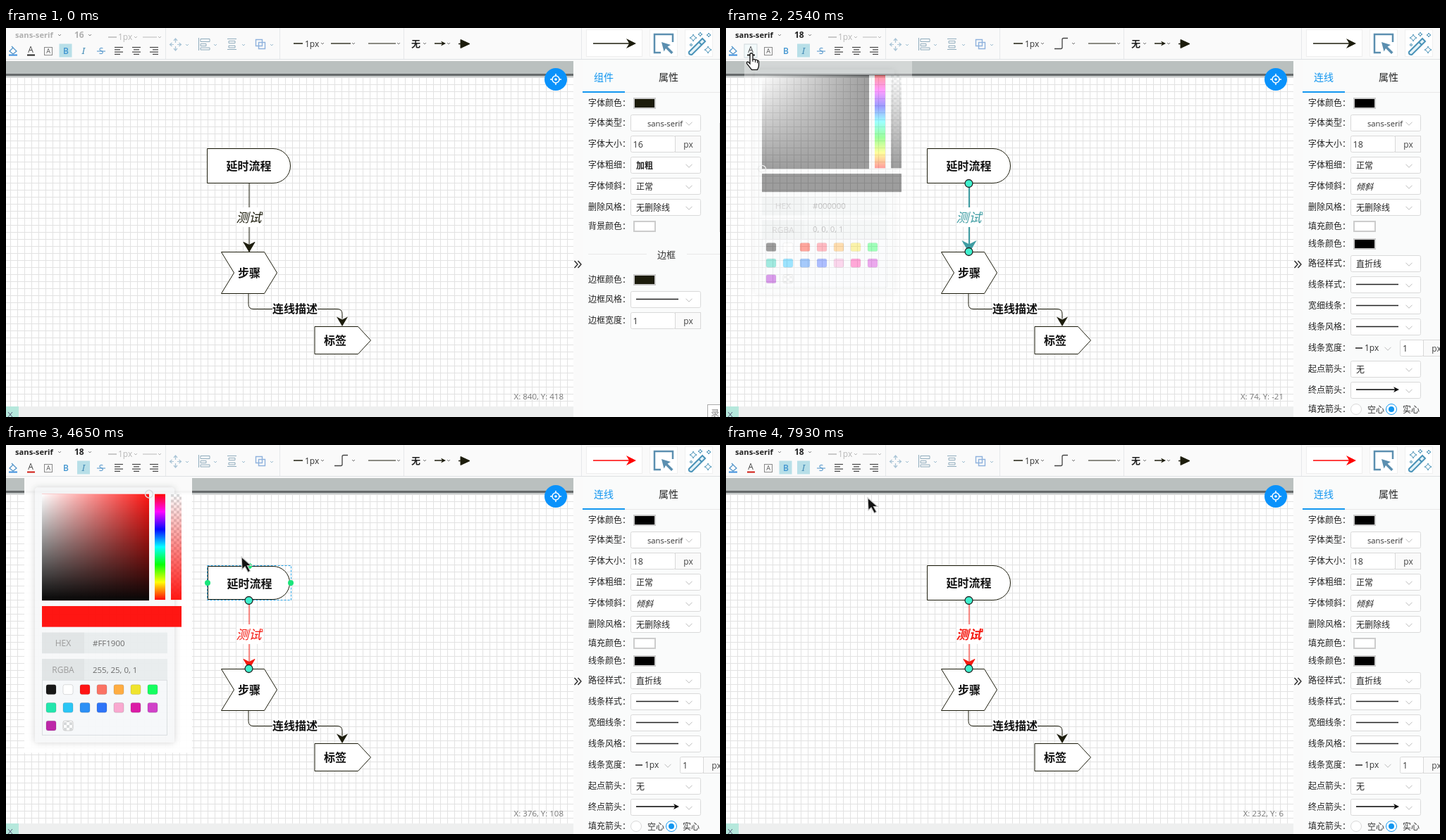
Animation of 1013 by 553 pixels, one loop 8 s. Source, as an HTML page:

```html
<!DOCTYPE html>
<html lang="zh-CN">
<head>
<meta charset="utf-8">
<title>Flow editor</title>
<style>
  html, body { margin: 0; width: 100%; height: 100%; overflow: hidden; background: #fafafa; }
  svg { display: block; font-family: "Open Sans", "Noto Sans CJK SC", "Noto Sans CJK", sans-serif; }
  .zh { font-family: "Noto Sans CJK SC", "Noto Sans CJK", sans-serif; }
</style>
</head>
<body>
<svg id="stage" width="1013" height="553" viewBox="0 0 1013 553"></svg>
<script>
const LOOP = 8000, STEP = 131.8;
const INK = '#1c1c0c', TEAL = '#3f9da3', RED = '#f5180f', BLUE = '#1296f0', ICON = '#5b8fb0', FADED = '#b8b8b8';

// ---- drawing helpers, all returning SVG markup
const line = (x1, y1, x2, y2, color = INK, w = 1, more = '') =>
  `<line x1="${x1}" y1="${y1}" x2="${x2}" y2="${y2}" stroke="${color}" stroke-width="${w}" ${more}/>`;
const rect = (x, y, w, h, fill, stroke = 'none', more = '') =>
  `<rect x="${x}" y="${y}" width="${w}" height="${h}" fill="${fill}" stroke="${stroke}" ${more}/>`;
const path = (d, stroke = INK, fill = 'none', w = 1, more = '') =>
  `<path d="${d}" stroke="${stroke}" fill="${fill}" stroke-width="${w}" ${more}/>`;
const dot = (x, y, r, fill, stroke = 'none', w = 1) =>
  `<circle cx="${x}" cy="${y}" r="${r}" fill="${fill}" stroke="${stroke}" stroke-width="${w}"/>`;
const text = (x, y, str, size = 12, fill = '#333', more = '') =>
  `<text x="${x}" y="${y + size * 0.37}" font-size="${size}" fill="${fill}" ${more}>${str}</text>`;
const group = (id, body, more = '') => `<g id="${id}" ${more}>${body}</g>`;
const bold = 'font-weight="700"', mid = 'text-anchor="middle"', zh = 'class="zh"';
const caret = (x, y, color = '#777', r = 2) => path(`M${x - r} ${y - r / 2}l${r} ${r}l${r} ${-r}`, color);
const arrowRight = (x1, x2, y, size, color = INK, w = 1.5) => line(x1, y, x2 - size * .6, y, color, w) +
  path(`M${x2} ${y}l${-size} ${-size / 2}l${size * .3} ${size / 2}l${-size * .3} ${size / 2}z`, 'none', color);
const arrowDown = (x, y) => `<path d="M${x} ${y}l-8-13.500l8 4l8-4z"/>`;

// ---- toolbar
function toolbar() {
  const carets = [[257, 24], [297, 24], [337, 24], [377, 24]].map(([x, y]) => caret(x, y, '#9dbdd0')).join('');
  const aligns = [[154, 0], [179, .5], [204, 1]].map(([x, a]) =>
    [12, 8, 12, 8].map((w, i) => line(x + (12 - w) * a, 27.5 + i * 3.3, x + (12 - w) * a + w, 27.5 + i * 3.3, '#444', 1.2)).join('')).join('');
  const soft = '#a9c4d6';
  return rect(0, 0, 1013, 45, '#fafafa') + line(0, 44.5, 1013, 44.5, '#dfe2e4') +
    group('font', text(13, 10, 'sans-serif', 11.2, 'currentColor', bold) + text(97, 10, '<tspan id="size">16</tspan>', 12, 'currentColor', bold)) +
    caret(76, 10, '#888') + caret(119, 10, '#888') +
    line(145, 13, 157, 13, FADED, 1.5) + text(159, 13, '1px', 12, FADED) + caret(184, 13, FADED) +
    line(194, 13, 214, 13, FADED) + caret(218, 13, FADED) +
    rect(75.500, 22.500, 18, 19, '#b8dfe8', 'none', 'id="boldOn"') +
    rect(101, 22.500, 18, 19, '#b8dfe8', 'none', 'id="italicOn"') +
    rect(26, 23, 18, 19, '#f3fafb', '#cfd8dc', 'id="hover"') +
    path('M5 33l5-5l5 5l-5 4zM8 26l3 3', '#4a90c8', 'none', 1.2) + line(4, 38.500, 16, 38.500, '#3b8ddd', 2) +
    text(35, 31, 'A', 12, '#444', mid) + line(30, 38.500, 41, 38.500, INK, 2, 'id="inkBar"') +
    rect(54.500, 27.500, 11, 11, 'none', '#888') + text(60, 33, 'A', 9, '#555', mid) +
    text(85, 32.500, 'B', 12, '#3f95d0', mid + ' font-weight="600"') +
    text(110, 32.500, 'I', 13, '#4a90b8', mid + ' style="font-family:Noto Serif,serif" font-style="italic"') +
    text(135, 32.500, 'S', 12, '#4a90c8', mid) + line(129, 33, 141, 33, '#4a90c8') + aligns +
    [226.500, 388.500, 564.500, 816.500].map(x => line(x, 0, x, 44, '#e6e8ea')).join('') + carets +
    path('M240.500 16v5M240.500 26v5M233 23.500h5M243 23.500h5M238 18l2.500-3l2.500 3M238 29l2.500 3l2.500-3M235.500 21l-3 2.500l3 2.500M245.500 21l3 2.500l-3 2.500', soft, 'none', 1.2) +
    path('M273.500 14v18M276 15.500h13v4h-13zM276 22.500h8v3h-8zM276 28h13v3h-13z', '#8eabbc') +
    path('M314 15.500h13M314 30.500h13M316 18.500h9v3h-9zM316 25h9v3h-9z', '#8eabbc') +
    path('M354.500 16.500h9v9h-9zM358.500 20.500h9v9h-9z', '#8fb2dd', 'none', 1.4) +
    line(408, 22, 421, 22, INK, 1.5) + text(424, 22.500, '1px', 12, '#333') + caret(449, 22) +
    line(461, 22, 489, 22, INK, 1.3, 'id="straight"') + path('M466 29.500h9q2 0 2-2v-11q0-2 2-2h6', '#444', 'none', 1.3, 'id="ortho"') +
    caret(493, 22) + line(514, 22, 553, 22, INK, 1.2) + caret(557, 22) +
    text(575, 22, '无', 13, '#222', bold + zh) + caret(594, 22) + arrowRight(608, 624, 22, 7) + caret(628, 22) +
    path('M645 16.500l13 6l-13 6z', INK, INK) + line(642, 22.500, 646, 22.500, INK, 1.5) +
    rect(823.500, 2.500, 79, 38, '#fff', '#eee') + group('preview', arrowRight(833, 894, 22, 14, 'currentColor', 1.4)) +
    rect(913.500, 2.500, 39, 38, '#fff', '#f0f0f0') + rect(963.500, 2.500, 39, 38, '#fff', '#f0f0f0') +
    path('M929 35h-9v-26h26v11', ICON, 'none', 2.5) + path('M930 20l13 4l-4.500 2.500l8 8l-2.500 2.500l-8-8l-2.500 4.500z', 'none', ICON) +
    path('M969 34l19-19l4 4l-19 19q-5 0-4-4zM983 20l4 4', '#4a93b8', '#e5f3f8', 2) +
    [[975, 14, 5], [996, 31, 5], [985, 9, 3], [997, 10, 3], [972, 24, 2]].map(([x, y, r]) =>
      path(`M${x} ${y - r}l${r / 3} ${r * 2 / 3}l${r * 2 / 3} ${r / 3}l${-r * 2 / 3} ${r / 3}l${-r / 3} ${r * 2 / 3}l${-r / 3} ${-r * 2 / 3}l${-r * 2 / 3} ${-r / 3}l${r * 2 / 3} ${-r / 3}z`, '#4a93b8')).join('');
}

// ---- diagram
function diagram() {
  const node = str => `${bold} ${mid} ${str || ''} ${zh}`;
  return rect(0, 47, 805, 506, '#fff') + rect(0, 69, 805, 469, 'url(#grid)') +
    rect(0, 47, 805, 22, '#bac0bf') + rect(0, 65, 805, 3, '#666a6b') + rect(0, 68, 805, 2, '#c4c8c8') +
    rect(0, 538, 805, 15, '#eeefef') + rect(0, 538, 18, 15, '#b5e8dc') + path('M3 546l6 7M9 546l-6 7', '#557') +
    path('', INK, '#fff', 1, 'id="delay"') + text(344.500, 196, '延时流程', 16, '#111', node('id="delayText"')) +
    path('M305.500 318.500h61l18 29.500l-18 29.500h-61l18-29.500z', INK, '#fff') + text(345, 348, '步骤', 16, '#111', node()) +
    path('M438 424.500h61.500l18 19.500l-18 19.500h-61.500z', INK, '#fff') + text(467, 444, '标签', 16, '#111', node()) +
    path('M344 378v14.500q0 7 7 7h119q7 0 7 7v7') + `<g fill="${INK}">${arrowDown(477, 424)}</g>` +
    rect(378, 389, 64, 21, '#fff') + text(410, 399, '连线描述', 16, '#111', node()) +
    group('edge', line(345, 221, 345, 310, 'currentColor') +
      `<g fill="currentColor" stroke="currentColor" stroke-width=".5">${arrowDown(345, 318)}</g>` +
      rect(327, 255, 37, 28, '#fff') + text(344.500, 269.500, '测试', 18, 'currentColor', `${mid} font-style="italic" id="edgeText" ${zh}`)) +
    group('focus', rect(285.500, 171.500, 119, 49, 'none', '#2aa5e8', 'stroke-dasharray="3 2"') +
      dot(286, 196, 4, '#19e57a') + dot(404, 196, 4, '#19e57a') + dot(345, 172, 4, '#19e57a')) +
    group('ends', dot(344.500, 221, 5.500, '#3ff0cd', '#222', 1.3) + dot(344.500, 318, 5.500, '#3ff0cd', '#222', 1.3)) +
    dot(780, 73, 16, '#0a92fb') + dot(780, 73, 5, 'none', '#fff', 1.5) + dot(780, 73, 1.800, '#fff') +
    path('M780 65v3M780 78v3M772 73h3M785 73h3', '#fff', 'none', 1.5) +
    text(791, 524, '', 11.5, '#777', 'text-anchor="end" id="coords"');
}
// a box with a round right end, shrunk by the inset on every side
const delayShape = inset => {
  const h = 49 - 2 * inset, r = h / 2;
  return `M${285.5 + inset} ${171.5 + inset}H${403.5 - inset - r}a${r} ${r} 0 0 1 0 ${h}H${285.5 + inset}z`;
};

// ---- property panels
const label = (y, str) => text(826, y, str + '：', 12, '#222', zh);
const box = (x, y, w) => rect(x + .5, y - 11.500, w, 23, '#fff', '#d9d9d9', 'rx="2"');
const swatchRow = (y, str, color) => label(y, str) + rect(891, y - 7, 30, 14, color, '#ccc', 'stroke-width="2"');
const select = (y, str, inner) => label(y, str) + box(886, y, 99) + caret(969, y + 1, '#bbb', 4.5) + inner;
const choice = (y, str, value, more = '') => select(y, str, text(894, y + 1, value, 12, '#222', `${zh} ${more}`));
const lineChoice = (y, str) => select(y, str, line(894, y - .5, 954, y - .5, '#222', 1.3));
const unit = (x, y) => rect(x + .5, y - 11.500, 36, 23, '#fafafa', '#d9d9d9') + text(x + 19, y + 1, 'px', 12, '#444', mid);
const number = (y, str, value) => label(y, str) + box(886, y, 63) + text(889.5, y, value, 12.5) + unit(949, y);
const fontRows = (ink, size, weight, slant) => swatchRow(107, '字体颜色', ink) +
  select(135, '字体类型', text(910, 136, 'sans-serif', 11.2)) + number(165, '字体大小', size) +
  choice(195, '字体粗细', ...weight) + choice(225, '字体倾斜', ...slant) + choice(255, '删除风格', '无删除线');

function panels() {
  const nodePanel = text(834, 70, '组件', 14, BLUE, zh) + fontRows(INK, 16, ['加粗', bold], ['正常']) +
    swatchRow(282, '背景颜色', '#fff') + line(826, 321.500, 909, 321.500, '#e8e8e8') + line(966, 321.500, 1013, 321.500, '#e8e8e8') +
    text(924, 322, '边框', 13, '#333', zh) + swatchRow(358, '边框颜色', INK) + lineChoice(386, '边框风格') +
    number(416, '边框宽度', 1) + line(1012.500, 135, 1012.500, 290, '#ddd');
  const edgePanel = text(834, 70, '连线', 14, BLUE, zh) + fontRows('#000', 18, ['正常'], ['倾斜', 'font-style="italic"']) +
    swatchRow(282, '填充颜色', '#fff') + swatchRow(307, '线条颜色', '#000') + choice(335, '路径样式', '直折线') +
    ['线条样式', '宽细线条', '线条风格'].map((str, i) => lineChoice(365 + 30 * i, str)).join('') +
    label(455, '线条宽度') + line(893, 455, 903, 455, '#222', 1.5) + text(906, 455, '1px', 12) + caret(939, 456, '#bbb', 4.5) +
    box(956, 455, 33) + text(960, 455, '1', 12.5) + unit(989, 455) +
    choice(485, '起点箭头', '无') + select(515, '终点箭头', arrowRight(894, 955, 514, 8, '#000')) +
    label(542, '填充箭头') + dot(894, 542, 7.500, '#fff', '#d9d9d9') + text(910, 543, '空心', 12, '#333', zh) +
    dot(944, 542, 7.500, '#fff', BLUE) + dot(944, 542, 4, BLUE) + text(960, 543, '实心', 12, '#333', zh);
  return rect(805, 45, 13, 508, '#fafafa') + path('M806.500 331l4.500 5l-4.500 5M811.500 331l4.500 5l-4.500 5', '#222', 'none', 1.3) +
    rect(818, 46, 195, 507, '#fafbfb') + line(818, 91.500, 1013, 91.500, '#e8e8e8') + line(818, 91, 878, 91, BLUE, 2) +
    text(926, 70, '属性', 14, '#222', zh) + group('nodePanel', nodePanel) + group('edgePanel', edgePanel) +
    group('badge', rect(995.500, 535.500, 20, 20, '#fff', '#aaa') + text(1000, 548, '录', 12, '#888', zh));
}

// ---- colour picker
const PALETTES = {
  before: '#000 #fff #ff1900 #ff4f63 #ffab32 #f7e022 #08ff4c #0cc9b0 #00bbff #1577f5 #2a56ff #f797d2 #ff1c9b #cb1cd0 #9c00cc',
  after: '#111 #fff #ff0d0d #fb6f60 #ffab3c #f0e428 #0fff5c #1be6ab #25c5f5 #268df5 #2870f8 #f9a7cf #da16a4 #d03cc8 #bb22a6'
};
const field = (y, name, id) => rect(51, y, 178, 30, '#e9edee') + rect(51, y, 60, 30, '#e1e5e6') +
  text(81, y + 15.500, name, 12, '#999', mid) + text(123, y + 15.500, '', 11.5, '#666', `id="${id}"`);
const cell = i => [57 + 24 * (i % 7), 344 + 26 * Math.floor(i / 7)];
function picker() {
  const cells = PALETTES.before.split(' ').map((c, i) => rect(...cell(i), 14, 14, c, '#0002', 'rx="2.500" class="cell"')).join('');
  return rect(26, 47, 238, 395, '#fff', 'none', 'opacity=".96"') +
    rect(41, 61, 198, 366, '#f7f8f9', 'none', 'rx="4" filter="url(#shade)"') +
    rect(51, 70, 152, 153, '#000', 'none', 'id="tone"') + rect(51, 70, 152, 153, 'url(#white)') + rect(51, 70, 152, 153, 'url(#black)') +
    rect(211, 70, 15, 152, 'url(#hue)') + rect(234, 70, 15, 152, 'url(#check)') + rect(234, 70, 15, 152, 'url(#alpha)') +
    `<circle id="knob" r="5.500" fill="none" stroke="#ddd" stroke-width="1.500"/>` +
    rect(51, 231, 198, 30, '#000', 'none', 'id="sample"') + field(269, 'HEX', 'hex') + field(307, 'RGBA', 'rgba') +
    rect(51.500, 337.500, 177, 79, '#f6f8fa', '#d9dde0') + cells + rect(...cell(15), 14, 14, 'url(#check)', '#ccc', 'rx="2.500"');
}

const ramp = (id, stops, dir = 'x2="0" y2="1"') => `<linearGradient id="${id}" ${dir}>` +
  stops.map((s, i) => `<stop offset="${i / (stops.length - 1)}" ${s}/>`).join('') + '</linearGradient>';
const stop = (c, o = 1) => `stop-color="${c}" stop-opacity="${o}"`;
const defs = '<defs>' +
  '<pattern id="grid" width="10" height="10" x="6" y="0" patternUnits="userSpaceOnUse"><path d="M.500 0v10M0 .500h10" stroke="#e2e2e2" fill="none"/></pattern>' +
  '<pattern id="check" width="8" height="8" x="234" y="70" patternUnits="userSpaceOnUse"><path d="M0 0h8v8h-8z" fill="#fff"/><path d="M0 0h4v8h4v-4h-8z" fill="#d5d8d9"/></pattern>' +
  ramp('white', [stop('#fff'), stop('#fff', 0)], '') + ramp('black', [stop('#000', 0), stop('#000')]) +
  ramp('hue', ['#f00', '#f0f', '#00f', '#0ff', '#0f0', '#ff0', '#f00'].map(c => stop(c))) +
  `<linearGradient id="alpha" x2="0" y2="1"><stop class="end" offset="0" stop-opacity="0"/><stop class="end" offset="1"/></linearGradient>` +
  '<filter id="shade" x="-10%" y="-10%" width="120%" height="120%"><feDropShadow dx="0" dy="0" stdDeviation="5" flood-opacity=".18"/></filter></defs>';

const stage = document.getElementById('stage');
stage.innerHTML = defs + diagram() + panels() + toolbar() + group('picker', picker()) +
  group('arrow', path('M0 0l1 18l4-4l4.500 8l3-2l-4-7.500h5.500z', '#ccc', '#111', 1.2)) +
  group('hand', path('M-2 1q2-2.500 4 0v8q2-1.500 3.500.500q2-1 3 .800q2-.500 2 2v5q0 3-2 6h-8q-3-4-7-9q-.500-2.500 2-2l2.500 2.500z', '#111', '#fff', 1.3) +
    path('M2 9v3M5.500 10v3M8.500 11v3', '#111'));
const el = {};
stage.querySelectorAll('[id]').forEach(e => el[e.id] = e);

// ---- timeline, counted in steps: [step, x, y]
const ROUTE = [[0, 1030, 570], [1, 934, 527], [2, 661, 378], [3, 490, 315], [4, 390, 283], [5, 353, 262], [6, 346, 250],
  [8, 346, 248], [10, 280, 205], [12, 120, 125], [13.5, 73, 94], [14, 73, 87], [16.5, 40, 45], [17.5, 36, 36], [22, 36, 36],
  [24, 75, 220], [26, 108, 348], [27, 110, 352], [30, 110, 352], [33, 318, 225], [34.5, 342, 174], [35, 334, 159],
  [37.5, 136, 47], [40, 89, 30], [46, 89, 30], [48, 106, 90], [50, 118, 78], [52, 88, 32], [54, 100, 32], [56, 181, 28], [58, 186, 44], [59.5, 198, 72], [60, 201, 75]];
const OPEN = { 18: [.8, .1], 19: [.87, .38], 20: [.96, .85], 35: [.989, .97], 36: [.86, .35] };

function pointer(f) {
  const i = Math.max(1, ROUTE.findIndex(k => k[0] >= f));
  const [a, b] = [ROUTE[i - 1], ROUTE[i]], u = Math.max(0, (f - a[0]) / (b[0] - a[0]));
  return [a[1] + (b[1] - a[1]) * u, a[2] + (b[2] - a[2]) * u];
}
function coords(f) {
  for (let k = f - .5; k > 0; k--) {
    const [x, y] = pointer(k);
    const overPicker = k > 18 && k < 36 && x > 26 && x < 264 && y < 442;
    if (x < 806 && y >= 45 && !overPicker) return `X: ${Math.round(x + 34)}, Y: ${Math.round(y - 66)}`;
  }
  return 'X: 840, Y: 418';
}
const show = (e, on) => e.style.display = on ? '' : 'none';
const set = (e, attrs) => { for (const k in attrs) e.setAttribute(k, attrs[k]); };

function render(f) {
  const [x, y] = pointer(f);
  const selected = f >= 8, picked = f >= 28, strong = f >= 44, focus = f === 34 || f === 35;

  el.coords.textContent = coords(f);
  show(el.nodePanel, !selected); show(el.edgePanel, selected);
  el.badge.style.opacity = Math.max(0, 1 - f / 3);
  el.font.style.color = selected ? '#222' : '#b0b0b0';
  el.size.textContent = selected ? 18 : 16;
  show(el.straight, !selected); show(el.ortho, selected);
  show(el.boldOn, !selected || strong); show(el.italicOn, selected);
  el.inkBar.setAttribute('stroke', picked ? '#d01810' : '#222');
  el.preview.style.color = picked ? '#f00' : INK;

  const lit = f >= 5 && !picked;
  el.edge.style.color = picked ? RED : lit ? TEAL : INK;
  el.edge.querySelectorAll('[stroke-width]').forEach(e => e.setAttribute('stroke-width', lit ? 2 : 1));
  el.edgeText.setAttribute('font-weight', strong ? 700 : 400);
  show(el.ends, selected); show(el.focus, focus);
  el.delay.setAttribute('d', delayShape(focus ? 1 : 0));
  el.delayText.setAttribute('transform', focus ? 'translate(1 1)' : '');

  const open = f >= 18 && f <= 36, [scale, alpha] = OPEN[f] || [1, 1];
  show(el.picker, open);
  set(el.picker, { transform: `translate(0 47) scale(1 ${scale}) translate(0 -47)`, opacity: alpha });
  const color = picked ? '#ff0f0c' : '#000';
  set(el.tone, { fill: color }); set(el.sample, { fill: color });
  stage.querySelectorAll('.end').forEach(e => e.setAttribute('stop-color', color));
  set(el.knob, picked ? { cx: 203, cy: 70 } : { cx: 51, cy: 223 });
  el.hex.textContent = picked ? '#FF1900' : '#000000';
  el.rgba.textContent = picked ? '255, 25, 0, 1' : '0, 0, 0, 1';
  const fills = PALETTES[picked ? 'after' : 'before'].split(' ');
  stage.querySelectorAll('.cell').forEach((e, i) => {
    const [cx, cy] = cell(i), grow = f >= 26 && f <= 30 && i === 2 ? 3 : 0;
    set(e, { fill: grow && !picked ? '#ff7800' : fills[i], x: cx - grow, y: cy - grow, width: 14 + 2 * grow, height: 14 + 2 * grow });
  });

  const onButton = y < 44 && x < 220, hand = onButton || (f >= 26 && f <= 30);
  show(el.hover, onButton && !(strong && x < 100 && x > 70));
  el.hover.setAttribute('x', 26 + 25 * Math.round((x - 37) / 25));
  show(el.arrow, !hand); show(el.hand, hand);
  set(hand ? el.hand : el.arrow, { transform: `translate(${x} ${y})` });
}

let last = -1;
const start = performance.now();
function tick() {
  const f = Math.min(60, Math.floor(((performance.now() - start) % LOOP + 3) / STEP));
  if (f !== last) render(last = f);
  requestAnimationFrame(tick);
}
tick();
</script>
</body>
</html>
```
